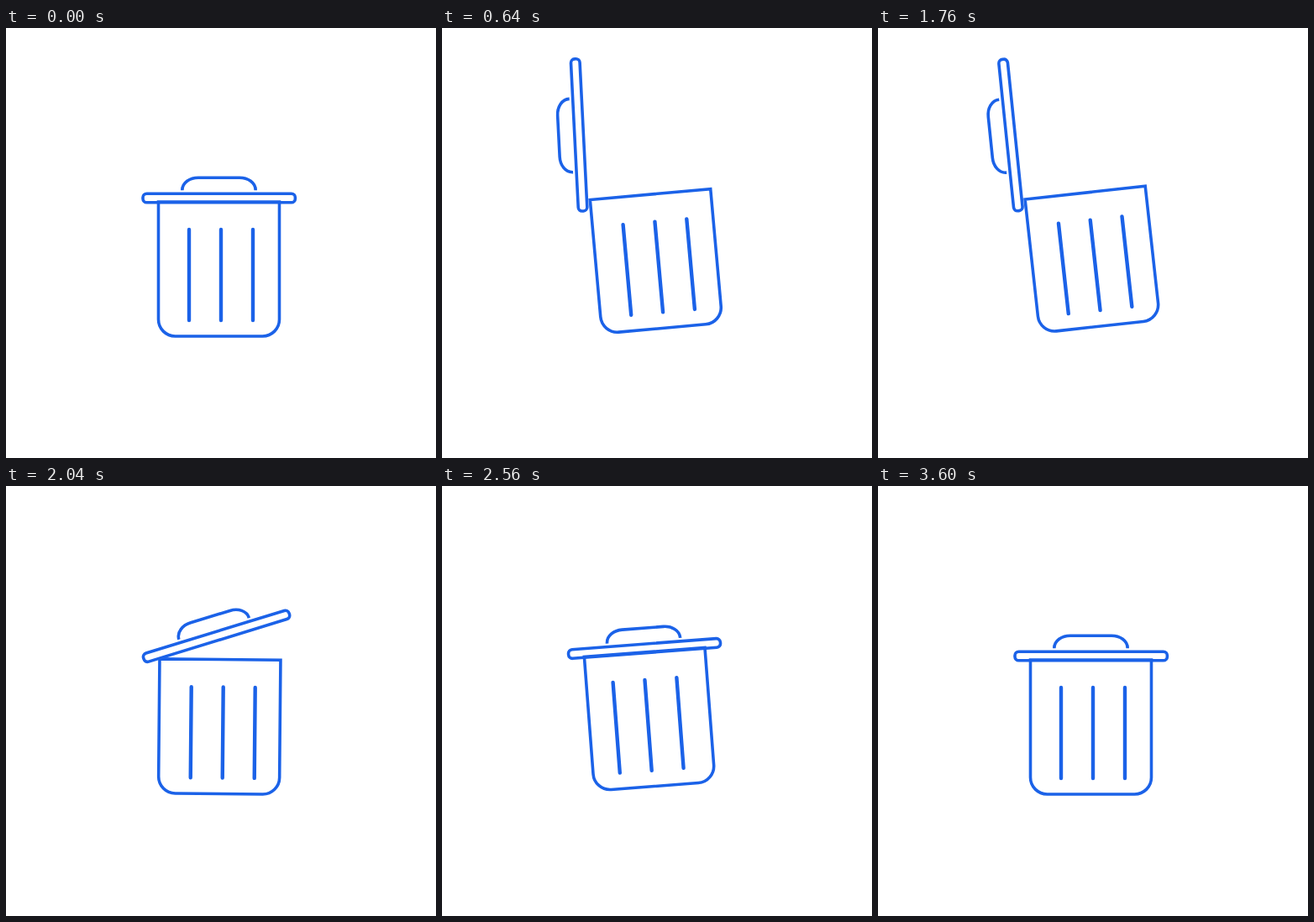
An HTML page for the animation above (3820 ms loop, 512x512 px).

```html
<!DOCTYPE html>
<html lang="en">
<head>
<meta charset="utf-8">
<title>Trash bin</title>
<style>
  html, body { margin: 0; width: 100%; height: 100%; overflow: hidden; background: #fff; }
  svg { display: block; width: 100vw; height: 100vh; }
  path, rect { fill: none; stroke: #1b62e8; stroke-width: 3.6; }
  #ribs path { stroke-width: 4.4; stroke-linecap: round; }
</style>
</head>
<body>
<svg viewBox="0 0 512 512">
  <g id="bin">
    <path id="body"/>
    <g id="ribs"></g>
    <g id="lid">
      <rect x="163" y="197.2" width="181.4" height="10.6" rx="4.6"/>
      <path d="M209.8 193.2C209.8 184 219 178.2 229 178.2H278C288 178.2 297.2 184 297.2 193.2"/>
    </g>
  </g>
</svg>
<script>
const LOOP = 3820, GAP = 38, FLOOR = 367;
const OPEN_END = 1580, CLOSED = 2190;
const $ = id => document.getElementById(id);

// Sine ease from 0 to 1 between two times.
const ease = (t, from, to) => {
  const u = Math.min(1, Math.max(0, (t - from) / (to - from)));
  return (1 - Math.cos(Math.PI * u)) / 2;
};
// Rises from 0 to 1 and falls back between two times.
const pulse = (t, from, to) => ease(t, from, (from + to) / 2) - ease(t, (from + to) / 2, to);

// Swings through [time, value] poses, easing each leg.
const swing = poses => t => poses.slice(1).reduce(
  (v, [time, value], i) => v + (value - poses[i][1]) * ease(t, poses[i][0], time), poses[0][1]);

const tilt = swing([[0, 0], [1090, -8.05], [OPEN_END, -8.05], [2300, 4], [2700, -7.5], [3060, 2.8], [3270, 0]]);
const roll = swing([[2000, 0], [2300, 36], [2700, -20], [3060, 2], [3300, 0]]);
const lidAngle = t => -100.2 * (ease(t, 0, 830) - ease(t, 1645, CLOSED));

// Leans back around a point beside it while open, then rocks on its bottom corners.
function pivot(t, angle) {
  if (angle > 0) return [306, FLOOR];
  return t < CLOSED ? [151, 264] : [200, FLOOR];
}

const ribs = [-2, -1, 0, 1].map(k => {
  const el = document.createElementNS("http://www.w3.org/2000/svg", "path");
  $("ribs").append(el);
  return { k, el };
});

function draw(t) {
  const angle = tilt(t), bulge = 6.5 * pulse(t, 2100, 2500), hop = 10.5 * pulse(t, 2180, 2690);
  const left = 181.5 - bulge, right = 325.5 + bulge;

  $("bin").setAttribute("transform",
    `translate(${bulge} ${-hop}) rotate(${angle} ${pivot(t, angle)})`);
  $("lid").setAttribute("transform", `rotate(${lidAngle(t)} 176.3 206.5)`);
  $("body").setAttribute("d", `M${left} 207V347A20 20 0 0 0 ${left + 20} ${FLOOR}`
    + `H${right - 20}A20 20 0 0 0 ${right} 347V207Z`);

  for (const { k, el } of ribs) {
    // The rib rolling in from the left starts as tall as the wall.
    const tall = k === -2 ? 1 - ease(t, 2160, 2440) : 0;
    const x = 256 + k * GAP + roll(t) - 8 * tall;
    el.setAttribute("d", `M${x} ${240 - 33 * tall}V${348 + 15 * tall}`);
    el.style.display = x > left ? "" : "none";
  }
}

let start;
function tick(now) {
  start ??= now;
  draw((now - start) % LOOP);
  requestAnimationFrame(tick);
}
draw(0);
requestAnimationFrame(tick);
</script>
</body>
</html>
```
